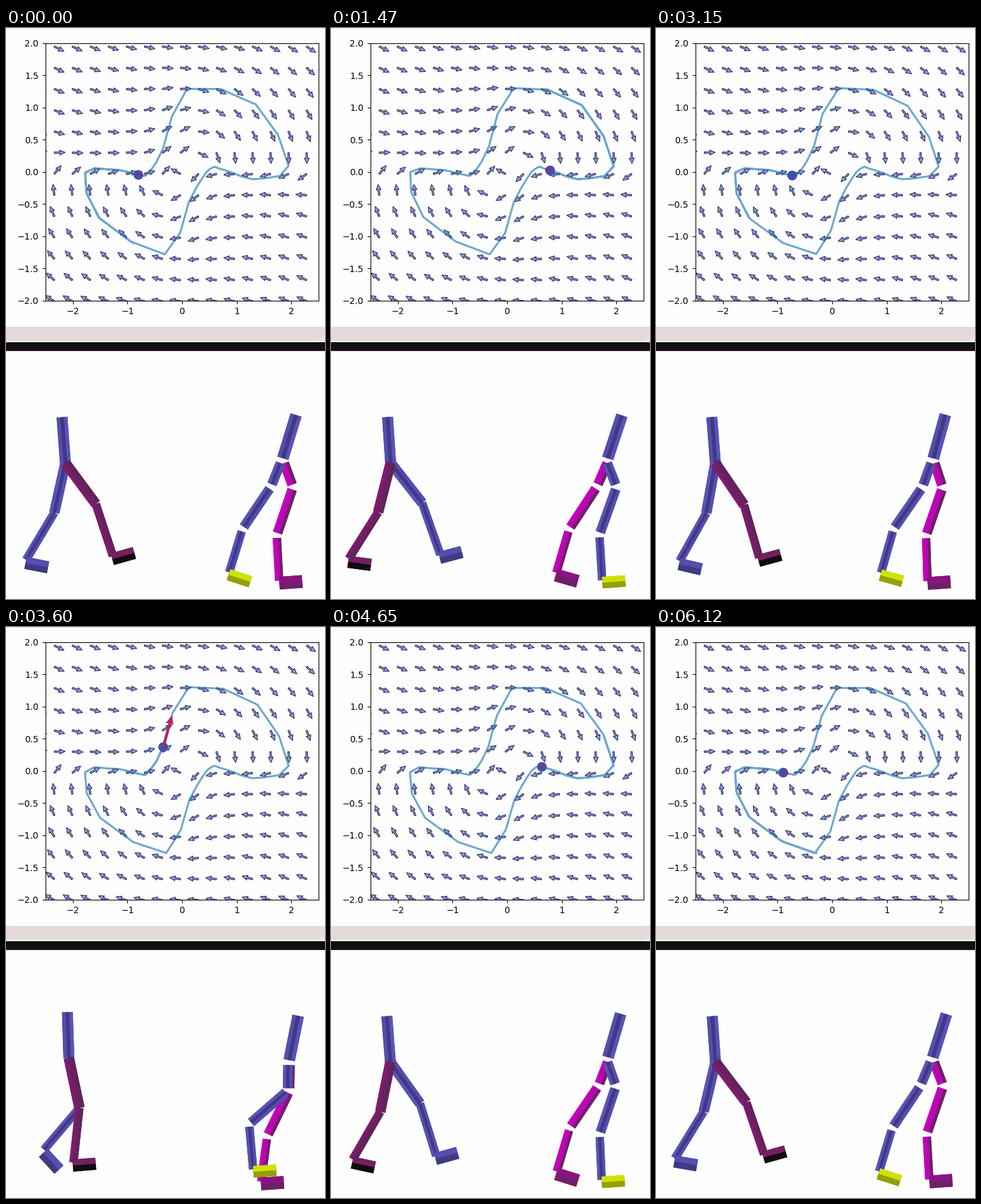
Animation of 500x896 px, one loop 6.15 s. Source, as a matplotlib script:

```python
import numpy as np
import matplotlib.pyplot as plt
from matplotlib.animation import FuncAnimation
from matplotlib.collections import PolyCollection
from matplotlib.patches import Rectangle

W, H, DPI = 500, 896, 100
FRAMES, STEP_MS = 205, 30
STEPS = 41            # orbit updates per gait cycle
TRAIL = 50            # updates kept in the trail

BLUE = ["#5a52ba", "#3f3a82", "#554db0"]
PLUM = ["#84186f", "#672460", "#642259"]
PINK = ["#c400bd", "#b808ae", "#6f2069"]
PLUM_FOOT = ["#6a2260", "#80206f"]
DARK_FOOT = ["#120a12", "#74205f"]
PINK_FOOT = ["#6f2069", "#8a1580"]
LIME_FOOT = ["#969f06", "#cfe204"]

# ---- limit cycle: key points (update, x, y) in stage pixels ----
KEYS = np.array([
    (0, 207, 230), (4, 224, 226), (7, 247, 187), (9, 285, 95), (11, 393, 121),
    (13, 443, 217), (15, 404, 236), (19, 343, 223), (24, 322, 220),
    (27, 308, 235), (29, 287, 272), (31, 250, 355), (33, 146, 298),
    (35, 124, 227), (37, 161, 222)], float)
KEY_T = np.concatenate([KEYS[:, 0] + n * STEPS for n in (-1, 0, 1)])
KEY_XY = np.tile(KEYS[:, 1:], (3, 1))
KEY_V = np.gradient(KEY_XY, KEY_T, axis=0)


def orbit(k):
    """Closed Hermite curve at updates k; successive laps drift a little."""
    k = np.atleast_1d(k)
    t = (k + .05 * np.cos(np.pi * k / STEPS)) % STEPS
    i = np.searchsorted(KEY_T, t, "right") - 1
    h = (KEY_T[i + 1] - KEY_T[i])[:, None]
    s = (t - KEY_T[i])[:, None] / h
    return (KEY_XY[i] * (1 + 2 * s) * (1 - s) ** 2
            + KEY_XY[i + 1] * s * s * (3 - 2 * s)
            + KEY_V[i] * h * s * (1 - s) ** 2
            - KEY_V[i + 1] * h * s * s * (1 - s))


def to_data(p):
    return np.column_stack([(p[:, 0] - 276) / 85.6, (226 - p[:, 1]) / 101])


def flow(x, y):
    """Heading of the field, odd about the centre."""
    u = y - .28 * np.tanh(2 * x)
    v = (.3 * np.sin(2.4 * y) * np.exp(-2 * x * x)
         - 1.5 * x * x / (1.5 + x * x) * np.tanh(.9 * y)
         - .36 * np.tanh(4 * x) * np.abs(np.sin(1.6 * y))
         - .9 * x * np.exp(-6 * x * x - 8 * y * y)
         - .02 * x ** 3 * np.exp(-5 * y * y))
    return np.arctan2(v, u)


# ---- gait: angles in degrees from straight down, phase in [0, 1) ----
def swing(p, peak):
    return np.cos(2 * np.pi * (p - peak))


def bump(p, center, width):
    d = (p - center + .5) % 1 - .5
    return np.exp(-(d / width) ** 2)


def left_pose(p):
    thigh = 12 + 28 * swing(p, .42)
    shin = thigh - 18 - 58 * bump(p, .25, .11)
    pitch = -4 + 54 * bump(p, .2, .13) - 12 * bump(p, .5, .1) + 10 * bump(p, 0, .06)
    return thigh, shin, pitch


def right_pose(p):
    hip = -1 + 24 * swing(p, .42)
    thigh = -26 - 30 * bump(p, .24, .13) + 8 * bump(p, .5, .08) - 7 * bump(p, 0, .1)
    shin = -8 + 30 * bump(p, .28, .12) + 10 * bump(p, .5, .1) - 9 * bump(p, 0, .08)
    return hip, thigh, shin, -4 + 22 * bump(p, 0, .07)


def along(p, angle, length):
    t = np.radians(angle)
    return np.asarray(p) + length * np.array([np.sin(t), np.cos(t)])


class Mesh:
    def __init__(self):
        self.quads, self.colors = [], []

    def bar(self, p, angle, length, width, shades, trim=0):
        """Shaded rod from p; returns its far joint."""
        end = along(p, angle, length)
        a, b = along(p, angle, trim), along(end, angle, -trim)
        t = np.radians(angle)
        n = np.array([np.cos(t), -np.sin(t)]) * width
        cuts = np.linspace(-.5, .5, len(shades) + 1)
        # full-width base hides seams between the strips
        strips = [(-.5, .5, shades[-2]), *zip(cuts, cuts[1:], shades)]
        for lo, hi, c in strips:
            self.quads.append([a + lo * n, a + hi * n, b + hi * n, b + lo * n])
            self.colors.append(c)
        return end

    def foot(self, ankle, pitch, shades, thick=19):
        self.bar(ankle, 90 - pitch, 36, thick, shades)


def left_walker(mesh, p):
    beat = 2 * p
    hip = (97 + 4 * swing(beat, .53), 678.5 + 4 * swing(beat, 0))
    mesh.bar(hip, 182 - 2.5 * swing(beat, .58), 72, 17, BLUE)
    for shift, rod in ((0, BLUE), (.5, PLUM)):
        thigh, shin, pitch = left_pose(p + shift)
        knee = mesh.bar(hip, thigh, 80, 16, rod)
        ankle = mesh.bar(knee, shin, 86, 13, rod)
        sole = BLUE[1:] if rod is BLUE else DARK_FOOT if pitch < 20 else PLUM_FOOT
        mesh.foot(ankle + (-1, 5), pitch, sole)


def right_walker(mesh, p):
    beat = 2 * p
    hip = np.array([438.5 + 6 * swing(beat, .45), 682 + 3 * swing(beat, .5)])
    lean = 180 - 16 - 5 * swing(beat, .78)
    mesh.bar(along(hip, lean, 4), lean, 71, 18, BLUE)
    for shift, dx, rod, sole, thick in ((.5, 2, PINK, PINK_FOOT, 20),
                                        (0, -1, BLUE, LIME_FOOT, 18)):
        *angles, pitch = right_pose(p + shift)
        joint = hip + (dx, 0)
        for angle, length, width in zip(angles, (44, 80, 75), (15, 15, 13)):
            joint = mesh.bar(joint, angle, length, width, rod, trim=4)
        mesh.foot(joint, pitch, sole, thick)


# ---- stage ----
fig = plt.figure(figsize=(W / DPI, H / DPI), dpi=DPI, facecolor="#fefefe")
stage = fig.add_axes([0, 0, 1, 1])
stage.set(xlim=(0, W), ylim=(H, 0))
stage.axis("off")


def box(x, y, w, h, color):
    stage.add_patch(Rectangle((x, y), w, h, fc=color, lw=0))


box(0, 0, W, 1, "#e4d8da")
box(0, 469, W, 22, "#e4dada")
box(0, 493, W, 13, "#0e120e")
box(0, 506, W, 1, "#5a1050")
for i in range(4):
    for j in range(4 - i):
        box(498 - 2 * i, 489 - 2 * j, 1, 1, "#fbf6f6")
limbs = stage.add_collection(PolyCollection([], lw=0))

# ---- phase plot ----
ax = fig.add_axes([62 / W, 1 - 428 / H, 428 / W, 404 / H], facecolor="#fefefe")
ax.set(xlim=(-2.5, 2.5), ylim=(-2, 2), xticks=range(-2, 3),
       yticks=np.arange(-2, 2.1, .5))
ax.tick_params(axis="y", pad=4.2)

ticks = np.arange(-3, 2.5, .33)
gx, gy = np.meshgrid(ticks, ticks)
ang = flow(gx, gy)
ax.quiver(gx, gy, 17 * np.cos(ang), 17 * np.sin(ang), units="dots",
          scale_units="dots", scale=1, width=2.4, headwidth=3.2, headlength=3.6,
          headaxislength=3.2, fc="#8ea6ea", ec="#2e2852", lw=.8, zorder=2)
trail, = ax.plot([], [], color="#1f77b4", alpha=.65, lw=2.2, zorder=3,
                 solid_joinstyle="round")
dot, = ax.plot([], [], "o", ms=11, mew=0, color="#4350ab", zorder=4)
push = ax.quiver([0], [0], [1], [0], units="dots", scale_units="dots", scale=1,
                 width=3.6, headwidth=3, headlength=3.6, headaxislength=3.2,
                 fc="#d01c48", ec="#5a3a9c", lw=.6, zorder=5)


def draw(frame):
    k = frame * 2 // 5
    here, ahead = orbit([k, k + 1])
    trail.set_data(*to_data(orbit(np.arange(k - TRAIL, k + 1))).T)
    spot = to_data(here[None])
    dot.set_data(*spot.T)
    push.set_offsets(spot)
    dx, dy = ahead - here
    push.set_UVC([dx], [-dy])

    phase = (frame * 2 / FRAMES) % 1
    mesh = Mesh()
    left_walker(mesh, phase)
    right_walker(mesh, phase)
    limbs.set_verts(mesh.quads)
    limbs.set_facecolor(mesh.colors)
    return trail, dot, push, limbs


anim = FuncAnimation(fig, draw, frames=FRAMES, interval=STEP_MS, repeat=True,
                     repeat_delay=0, cache_frame_data=False)
plt.show()
```
